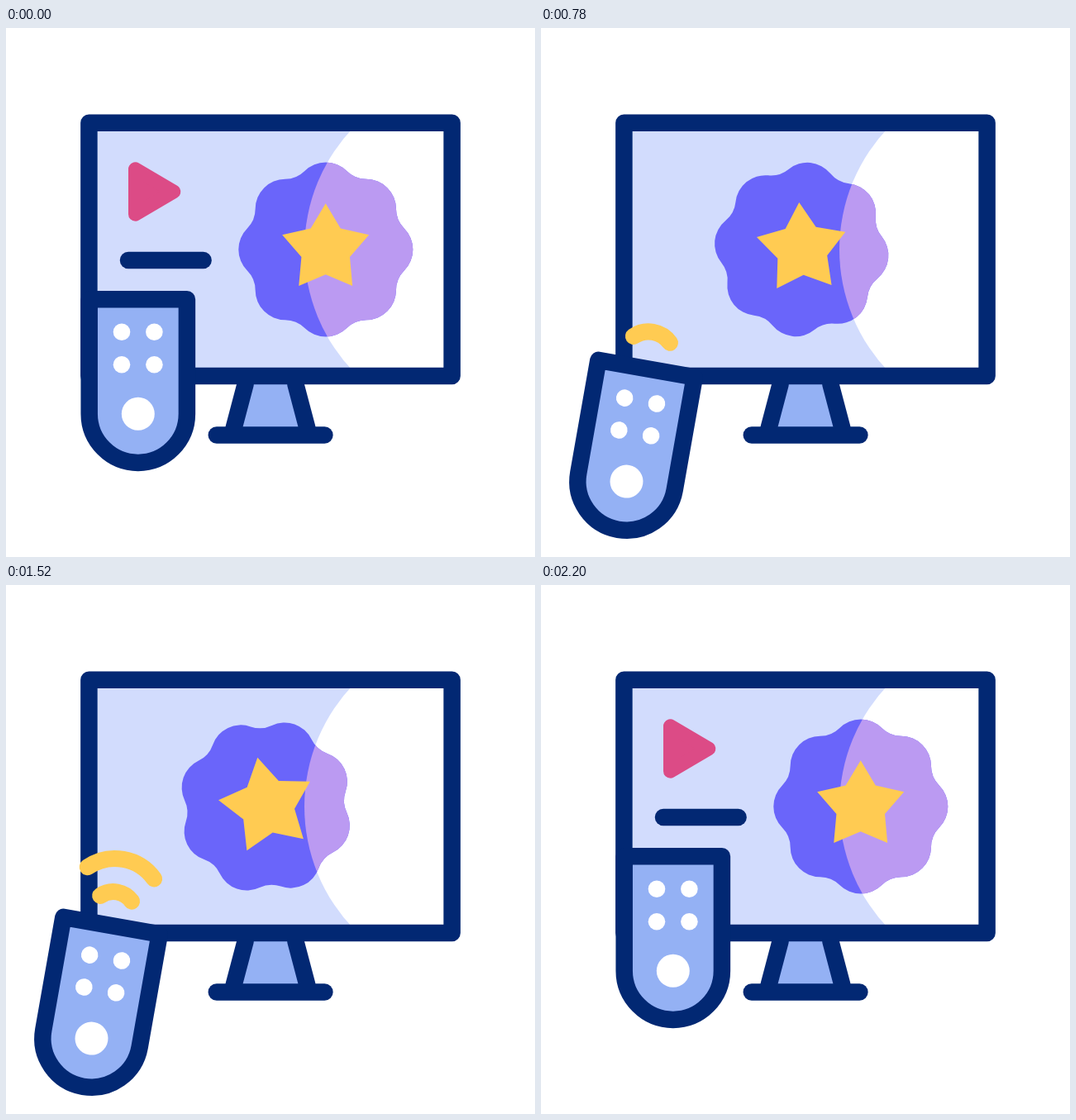
An HTML page with a canvas that plays this animation: 640 by 640 pixels, repeating every 2400 ms.

```html
<!DOCTYPE html>
<html lang="en">
<head>
<meta charset="utf-8">
<title>TV and remote</title>
<style>
html, body { margin: 0; width: 100%; height: 100%; overflow: hidden; background: #fff; }
canvas { display: block; width: 640px; height: 640px; }
</style>
</head>
<body>
<canvas id="stage"></canvas>
<script>
const LOOP = 2400;
const NAVY = '#022873', SCREEN = '#d2dcfd', BLUE = '#94b1f4', VIOLET = '#6a65fa',
      LILAC = '#bb9af2', YELLOW = '#ffcb52', PINK = '#dc4b86', WHITE = '#fff';
const LINE = 20.5, DEG = Math.PI / 180;

const canvas = document.getElementById('stage');
const ctx = canvas.getContext('2d');
const dpr = window.devicePixelRatio || 1;
canvas.width = canvas.height = Math.round(640 * dpr);

// Progress of t between a and b, and easings
const span = (t, a, b) => Math.min(1, Math.max(0, (t - a) / (b - a)));
const smooth = u => u * u * (3 - 2 * u);
const smoother = u => u * u * u * (u * (6 * u - 15) + 10);
const easeOut = u => 1 - (1 - u) ** 3;

function fill(color) {
  ctx.fillStyle = color;
  ctx.fill();
}

function stroke(color, width = LINE) {
  ctx.strokeStyle = color;
  ctx.lineWidth = width;
  ctx.stroke();
}

function poly(points, close) {
  ctx.beginPath();
  points.forEach(([x, y]) => ctx.lineTo(x, y));
  if (close) ctx.closePath();
}

function dot(x, y, r, color) {
  ctx.beginPath();
  ctx.arc(x, y, r, 0, 2 * Math.PI);
  fill(color);
}

function badgePath(x, y, turn) {
  const dist = 69.5, r = 36, step = 45 * DEG;
  ctx.beginPath();
  for (let i = 0; i < 8; i++) {
    const a = turn + i * step, next = a + step, mid = a + step / 2;
    ctx.arc(x + dist * Math.cos(a), y + dist * Math.sin(a), r, a - step, a + step);
    ctx.quadraticCurveTo(
      x + 92.2 * Math.cos(mid), y + 92.2 * Math.sin(mid),
      x + dist * Math.cos(next) + r * Math.cos(a),
      y + dist * Math.sin(next) + r * Math.sin(a));
  }
  ctx.closePath();
}

function star(x, y, turn, scale) {
  const points = [];
  for (let i = 0; i < 10; i++) {
    const r = (i % 2 ? 30.8 : 55.2) * scale, a = turn + (i * 36 - 90) * DEG;
    points.push([x + r * Math.cos(a), y + r * Math.sin(a)]);
  }
  poly(points, true);
  fill(YELLOW);
}

function stand() {
  poly([[289.7, 431], [276, 485], [364, 485], [350.3, 431]], true);
  fill(BLUE);
  poly([[288.4, 425], [274.5, 490]]);
  poly([[289.6, 431], [275.6, 484]]);
  stroke(NAVY);
  poly([[350.4, 431], [364.4, 484]]);
  stroke(NAVY);
  poly([[254.8, 492.6], [385.4, 492.6]]);
  stroke(NAVY);
}

function screen(t) {
  const slide = -71.2 * smooth(span(t, 200, 755));
  const spin = smooth(span(t, 680, 1200));

  ctx.save();
  ctx.beginPath();
  ctx.rect(105, 120, 430, 296);
  ctx.clip();
  ctx.fillStyle = SCREEN;
  ctx.fillRect(100, 115, 440, 306);
  dot(574.3, 268, 213.3, WHITE);

  // Play mark and caption slide away behind the frame
  const px = -125 * smooth(span(t, 200, 640));
  poly([[156.5 + px, 170.8], [156.5 + px, 225.2], [202.8 + px, 198]], true);
  fill(PINK);
  stroke(PINK, 17);
  const lx = -150 * smooth(span(t, 260, 770));
  poly([[148 + lx, 281], [238.6 + lx, 281]]);
  stroke(NAVY);

  const bx = 386.8 + slide - 4.2 * spin;
  badgePath(bx, 268, 59 * DEG * spin);
  fill(VIOLET);
  ctx.save();
  ctx.clip();
  dot(574.3, 268, 213.3, LILAC);
  ctx.restore();
  star(386.7 + slide + 1.8 * spin, 267.4 - spin, -35 * DEG * spin, 1 + 0.235 * spin);
  ctx.restore();

  ctx.beginPath();
  ctx.rect(100.4, 114.8, 439.2, 306.2);
  stroke(NAVY);
}

function wave(y, r, back) {
  const cx = 131.8 - 0.17 * back, cy = y + 0.985 * back;
  ctx.beginPath();
  ctx.arc(cx, cy, r, -124.5 * DEG, -35.5 * DEG);
  stroke(YELLOW, 20);
}

function signal(t) {
  const outer = easeOut(span(t, 736, 936));
  const inner = easeOut(span(t, 790, 1040));
  if (outer > 0) wave(388.8, 59.7 * outer, 23 * (1 - outer));
  if (inner > 0) wave(386.5, 27.5, 46 * (1 - inner));
}

function remote(t) {
  ctx.save();
  ctx.translate(
    159.8 - 56.3 * smoother(span(t, 280, 760)),
    466.8 + 81.8 * smooth(span(t, 200, 630)));
  ctx.rotate(10 * DEG * smooth(span(t, 200, 755)));
  ctx.beginPath();
  ctx.moveTo(-59.1, -138.6);
  ctx.lineTo(59.1, -138.6);
  ctx.lineTo(59.1, 0);
  ctx.arc(0, 0, 59.1, 0, Math.PI);
  ctx.closePath();
  fill(BLUE);
  stroke(NAVY);
  for (const x of [-19.8, 19.6])
    for (const y of [-99, -59.6]) dot(x, y, 10.3, WHITE);
  dot(0, 0, 20, WHITE);
  ctx.restore();
}

function draw(time) {
  // The second half plays the first half backwards
  const t = time < LOOP / 2 ? time : LOOP - time;
  ctx.setTransform(dpr, 0, 0, dpr, 0, 0);
  ctx.lineCap = ctx.lineJoin = 'round';
  ctx.fillStyle = WHITE;
  ctx.fillRect(0, 0, 640, 640);
  stand();
  screen(t);
  signal(t);
  remote(t);
}

const start = performance.now();
function tick() {
  draw((performance.now() - start) % LOOP);
  requestAnimationFrame(tick);
}
tick();
</script>
</body>
</html>
```
